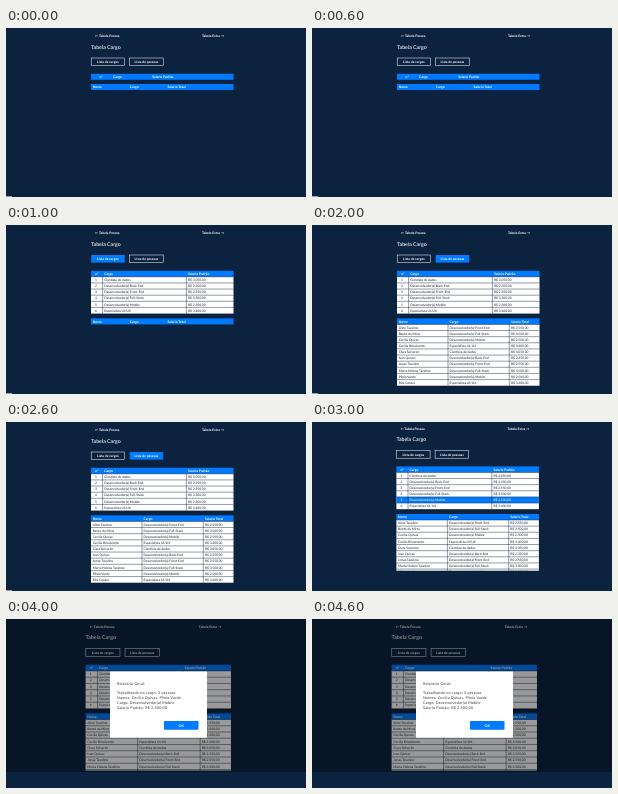
An HTML page for the animation above (5000 ms loop, 300 by 169 pixels).

```html
<!DOCTYPE html>
<html lang="pt-BR">
<head>
<meta charset="utf-8">
<title>Tabela Cargo</title>
<style>
  html, body { margin: 0; width: 100%; height: 100%; overflow: hidden; background: #0c2340; }
  svg { display: block; width: 100vw; height: 100vh; }
  text { font-family: Lato, "Open Sans", sans-serif; text-rendering: geometricPrecision; white-space: pre; }
</style>
</head>
<body>
<svg id="stage" viewBox="0 0 300 169" preserveAspectRatio="none"></svg>
<script>
const stage = document.getElementById('stage');
const BG = '#0c2340', BLUE = '#007bff', INK = '#2b2f36', WHITE = '#fff';
const LEFT = 85, WIDTH = 142.5, HEAD = 6, PITCH = 6.13;

const jobs = [
  ['Cientista de dados', '3.050'],
  ['Desenvolvedor(a) Back-End', '2.350'],
  ['Desenvolvedor(a) Front-End', '2.550'],
  ['Desenvolvedor(a) Full-Stack', '3.500'],
  ['Desenvolvedor(a) Mobile', '2.500'],
  ['Especialista UI/UX', '3.400']
].map(([title, pay]) => [title, `R$ ${pay},00`]);

const people = [
  ['Aline Tavelino', 2], ['Bento da Mirta', 3], ['Cecilia Quivas', 4],
  ['Cecilia Brisalvento', 5], ['Clara Solvarim', 0], ['Ivan Quivas', 1],
  ['Jonas Tavelino', 2], ['Marta Helena Tavelino', 3], ['Plinio Varde', 4], ['Rita Cordal', 5]
].map(([name, job]) => [name, ...jobs[job]]);

const jobRows = jobs.map((job, i) => [i + 1, ...job]);

const rect = (x, y, w, h, fill, extra = '') =>
  `<rect x="${x}" y="${y}" width="${w}" height="${h}" fill="${fill}" ${extra}/>`;

const label = (x, y, str, { size = 3.25, fill = WHITE, weight = 400, anchor = 'start', gap = 0 } = {}) =>
  `<text x="${x}" y="${y}" font-size="${size}" fill="${fill}" font-weight="${weight}" ` +
  `text-anchor="${anchor}" letter-spacing="${gap}">${str}</text>`;

const line = (x1, y1, x2, y2) =>
  `<path d="M${x1} ${y1}L${x2} ${y2}" stroke="${BG}" stroke-width=".45"/>`;

function button(x, str, active) {
  const frame = active ? '' : `stroke="${WHITE}" stroke-width=".5"`;
  return rect(x, 30, 33.5, 7.6, active ? BLUE : 'none', frame) +
    label(x + 16.75, 35, str, { size: 3.3, weight: 700, anchor: 'middle' });
}

function table(y, heads, cols, rows, selected) {
  let out = rect(LEFT, y, WIDTH, HEAD, BLUE);
  heads.forEach((head, i) => out += label(cols[i], y + 4.2, head, { size: 3.35, weight: 700 }));
  if (!rows.length) return out;

  const top = y + HEAD, bottom = top + rows.length * PITCH;
  out += rect(LEFT, top, WIDTH, bottom - top, WHITE);
  rows.forEach((cells, r) => {
    const rowY = top + r * PITCH, active = r === selected;
    if (active) out += rect(LEFT, rowY, WIDTH, PITCH, BLUE);
    cells.forEach((cell, i) =>
      out += label(cols[i], rowY + 4.2, cell, { fill: active ? WHITE : INK, weight: 500 }));
    out += line(LEFT, rowY, LEFT + WIDTH, rowY);
  });
  cols.slice(1).forEach(x => out += line(x - 1.6, top, x - 1.6, bottom));
  return out;
}

function page({ hover, showJobs, showPeople, selected = -1 }) {
  const nav = { size: 3.3, weight: 700 };
  return label(89, 9.3, '← Tabela Pessoa', nav) +
    label(218, 9.3, 'Tabela Extra →', { ...nav, anchor: 'end' }) +
    label(LEFT, 20.8, 'Tabela Cargo', { size: 5.25, weight: 500 }) +
    button(85.2, 'Lista de cargos', hover === 0) +
    button(123.7, 'Lista de pessoas', hover === 1) +
    table(45.8, ['n°', 'Cargo', 'Salario Padrão'],
      showJobs ? [89, 98.2, 182] : [93.5, 107, 146.2], showJobs ? jobRows : [], selected) +
    table(showJobs ? 93.4 : 56, ['Nome', 'Cargo', 'Salario Total'],
      showPeople ? [86.7, 137.6, 198.9] : [86.7, 123.8, 161.5], showPeople ? people : []);
}

function modal() {
  const rows = [
    [65.6, 'Relatório Geral:'],
    [75.2, 'Trabalhando no cargo: 2 pessoas'],
    [80.2, 'Nomes: Cecilia Quivas, Plinio Varde'],
    [85.2, 'Cargo: Desenvolvedor(a) Mobile'],
    [90.2, 'Salario Padrão: R$ 2.500,00']
  ];
  return rect(0, 0, 300, 153, '#000', 'opacity=".4"') +
    rect(104, 52.5, 97, 66.2, WHITE, 'rx=".6"') +
    rows.map(([y, str]) => label(111, y, str, { size: 3.7, fill: INK, gap: .2 })).join('') +
    rect(158, 102, 34.5, 8.7, BLUE, 'rx=".6"') +
    label(175.2, 107.6, 'OK', { size: 3.6, weight: 700, anchor: 'middle' });
}

const place = (transform, content) => `<g transform="${transform}">${content}</g>`;
const corner = rect(0, 168.2, 6, .8, '#b9c2cd');
const cover = y => rect(0, y, 300, 169 - y, BG);
const full = { showJobs: true, showPeople: true };

const scenes = [
  page({}) + corner,
  page({ hover: 0, showJobs: true }) + corner,
  page({ ...full, hover: 1 }) + corner,
  place('translate(-.6 -1.4)', page({ ...full, selected: 4 })) + cover(148.7),
  place('translate(-7.1 -.9) scale(1.02)', page(full)) + cover(151.5) + modal()
];

let shown = -1;
function draw(time) {
  const index = Math.floor(time % 5000 / 1000);
  if (index !== shown) {
    stage.innerHTML = rect(0, 0, 300, 169, BG) + scenes[index];
    shown = index;
  }
}

const start = performance.now();
function tick() {
  draw(performance.now() - start);
  requestAnimationFrame(tick);
}
tick();
</script>
</body>
</html>
```
